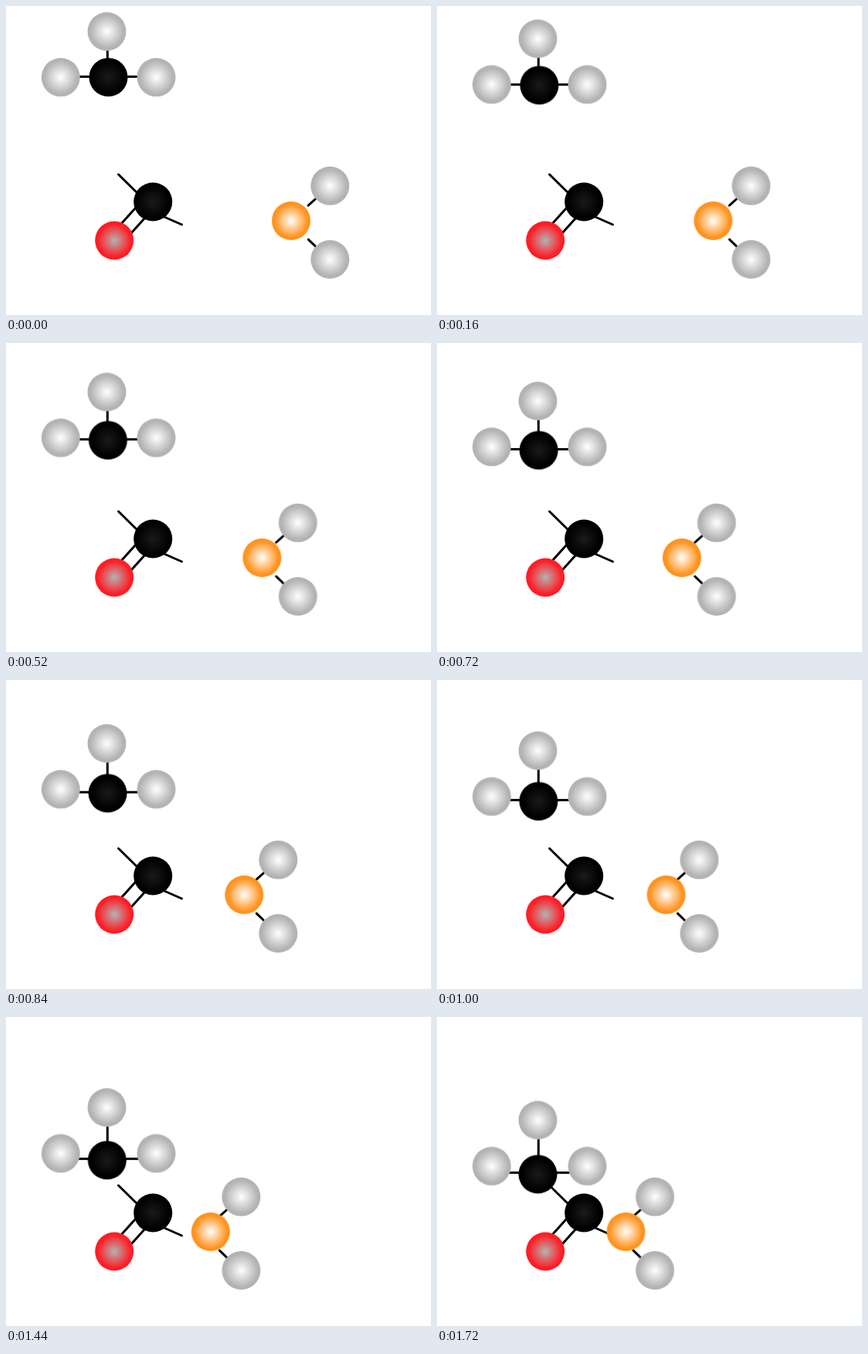
These frames come from a looping animation (550 px wide and 400 px high, 2160 ms). An HTML page:

```html
<!DOCTYPE html>
<html lang="en">
<head>
<meta charset="utf-8">
<title>Amide bond</title>
<style>
  html, body { margin: 0; width: 100%; height: 100%; overflow: hidden; background: #fff; }
  svg { display: block; width: 550px; height: 400px; }
  path { fill: none; stroke: #000; stroke-width: 3; stroke-linecap: round; }
</style>
</head>
<body>
<svg id="stage" viewBox="0 0 550 400"><defs id="defs"></defs></svg>
<script>
const LOOP = 2160, TRAVEL = 1720, STEP = 40;
const stage = document.getElementById('stage');

function add(parent, tag, attrs) {
  const node = document.createElementNS('http://www.w3.org/2000/svg', tag);
  for (const key in attrs) node.setAttribute(key, attrs[key]);
  return parent.appendChild(node);
}

// Centre colour, rim colour
const atoms = {
  hydrogen: ['#fff', '#b3b3b3'],
  carbon: ['#1a1a1a', '#000'],
  oxygen: ['#b3b3b3', '#ff1d25'],
  nitrogen: ['#fff', '#ff931e']
};
for (const [id, [core, rim]] of Object.entries(atoms)) {
  const gradient = add(document.getElementById('defs'), 'radialGradient', { id });
  add(gradient, 'stop', { offset: 0, 'stop-color': core });
  add(gradient, 'stop', { offset: 0.86, 'stop-color': rim });
}

// Moves a part by (dx, dy) in even steps, then holds it until the loop ends.
function slide(node, dx, dy) {
  if (!dx && !dy) return;
  const end = `translate(${dx}px, ${dy}px)`;
  node.animate([
    { transform: 'translate(0px, 0px)', offset: 0, easing: `steps(${TRAVEL / STEP}, end)` },
    { transform: end, offset: TRAVEL / LOOP },
    { transform: end, offset: 1 }
  ], { duration: LOOP, iterations: Infinity });
}

const bond = (d, dx = 0, dy = 0) => slide(add(stage, 'path', { d }), dx, dy);
const atom = (kind, cx, cy, dx = 0, dy = 0) =>
  slide(add(stage, 'circle', { cx, cy, r: 25, fill: `url(#${kind})` }), dx, dy);

// Carbonyl group, at rest
bond('M145.5 218 L180 252');
bond('M190 266.5 L227.5 283');
bond('M145 286.5 L172 256.5');
bond('M158 298.5 L185 268.5');
atom('carbon', 190.2, 253.5);
atom('oxygen', 140.2, 303.5);

// Methyl group, sinking
bond('M84 91.5 H182', 0, 110);
bond('M131.3 45 V92', 0, 105);
atom('hydrogen', 130.5, 33, 0, 100.5);
atom('hydrogen', 70.8, 92.3, 0, 100.7);
atom('hydrogen', 194.5, 92.3, 0, 100.7);
atom('carbon', 132.5, 92.2, -2, 111.3);

// Amino group, moving left
bond('M391.2 258.2 L408 243', -137.3);
bond('M391.2 302.2 L408 318.5', -137.3);
atom('hydrogen', 419.3, 232.8, -137.3);
atom('hydrogen', 419.3, 328, -137.3);
atom('nitrogen', 369, 278, -124.5);
</script>
</body>
</html>
```
